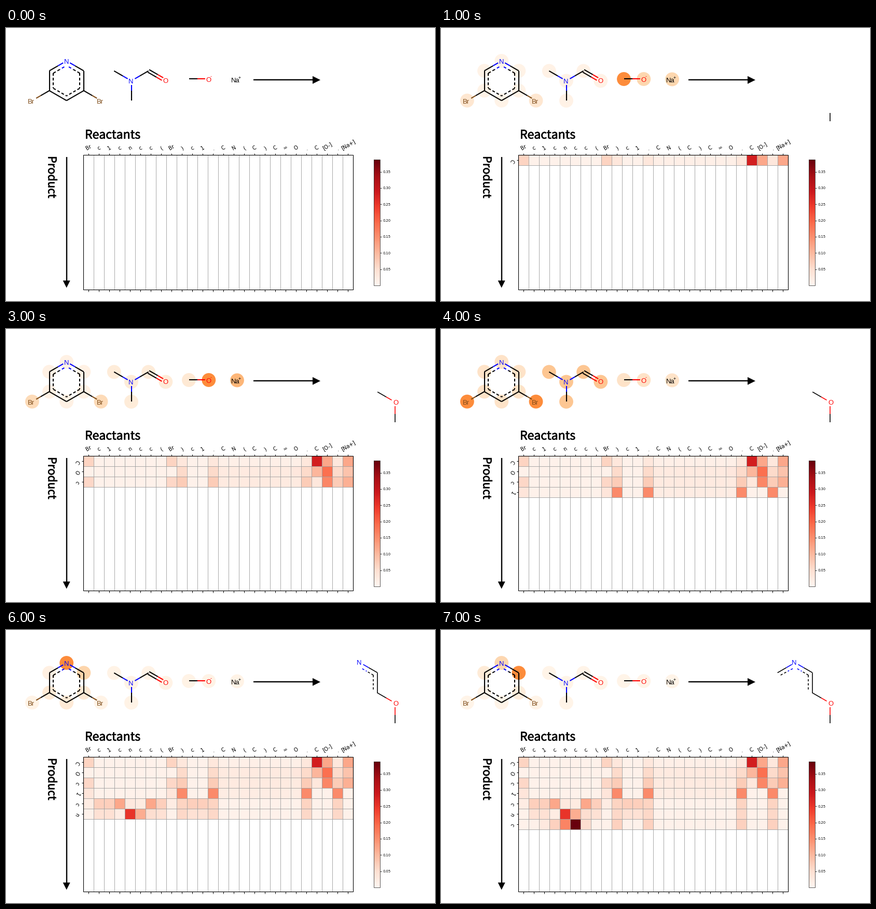
Recreate the animation shown at these times as a matplotlib script. Size 827x527 px, loop 8 s.

```python
import numpy as np
import matplotlib.pyplot as plt
from matplotlib.animation import FuncAnimation
from matplotlib.patches import Circle, Polygon, Rectangle
from matplotlib.patheffects import withStroke

W, H, DPI = 827, 527, 128
PT = 72 / DPI  # points per pixel
BLUE, RED, BROWN, GRAY = "#0000ff", "#ff0000", "#7f4c19", "#a0a0a0"
REDS, ORANGES = plt.get_cmap("Reds"), plt.get_cmap("Oranges")
VMAX = 0.387

TOKENS = "Br c 1 c n c c ( Br ) c 1 . C N ( C ) C = O . C [O-] . [Na+]".split()
OUTPUT = "C O c 1 c n c".split()
ROWS, COLS = 13, len(TOKENS)
LEFT, TOP, CELL = 149.3, 245.3, 20
RIGHT, BOTTOM = LEFT + COLS * CELL, TOP + ROWS * CELL

INDEX = np.arange(COLS)
IS_BREAK = np.isin(TOKENS, [".", ")"]) & (INDEX != 17)
IS_HALIDE = np.isin(TOKENS, ["Br"])
IS_ION = np.isin(TOKENS, ["[O-]", "[Na+]"])
IS_CLOSURE = np.isin(INDEX, [1, 2, 7, 10, 11])
IS_SOLVENT = (INDEX > 12) & (INDEX < 21)


def attend(foci, peak, left, right, breaks, halides=0.0, ions=0.0, closure=0.0, solvent=0.008):
    """Attention row: peaks fading to both sides, over levels per token class."""
    levels = [np.full(COLS, 0.01), IS_SOLVENT * solvent, IS_HALIDE * halides,
              IS_ION * ions, IS_CLOSURE * closure]
    for focus in foci:
        d = INDEX - focus
        levels.append(peak * np.where(d < 0, left, right) ** np.abs(d))
    return np.where(IS_BREAK, breaks, np.max(levels, axis=0))


heat = np.array([
    attend([22], 0.28, 0.1, 0.1, 0.033, halides=0.065, ions=0.12, solvent=0.015),
    attend([23], 0.185, 0.55, 0.1, 0.055, ions=0.085, solvent=0.025),
    attend([23], 0.16, 0.2, 0.2, 0.075, halides=0.06, ions=0.11, solvent=0.025),
    attend([], 0, 0, 0, 0.155, halides=0.035, solvent=0.02),
    attend([3, 6], 0.12, 0.2, 0.25, 0.065, halides=0.02, closure=0.07),
    attend([4], 0.25, 0.08, 0.45, 0.058, closure=0.045),
    attend([5], 0.385, 0.42, 0.13, 0.067),
])


def step(p, degrees, length=38.3):
    a = np.radians(degrees)
    return np.array(p) + length * np.array([np.cos(a), np.sin(a)])


# Input token index -> atom position
CENTER = np.array([116.7, 101.8])
ATOMS = {i: step(CENTER, 60 * k - 90) for k, i in enumerate([4, 5, 6, 10, 1, 3])}
ATOMS[0], ATOMS[8] = step(ATOMS[1], 150), step(ATOMS[6], 30)
ATOMS[14] = np.array([241.5, 102])
ATOMS[13], ATOMS[16], ATOMS[18] = (step(ATOMS[14], a) for a in (210, 90, -30))
ATOMS[20] = step(ATOMS[18], 30)
ATOMS[22] = np.array([352.5, 98.5])
ATOMS[23] = step(ATOMS[22], 0)
ATOMS[25] = np.array([445.5, 99])

fig = plt.figure(figsize=(W / DPI, H / DPI), dpi=DPI, facecolor="white")
ax = fig.add_axes([0, 0, 1, 1])
staged = []  # (artist, first step at which it shows)


def stage(artist, first):
    if first:
        staged.append((artist, first))
    return artist


def line(p, q, color="black", lw=1.0, first=0, dash=None, z=3):
    style = (0, dash) if dash else "-"
    art, = ax.plot([p[0], q[0]], [p[1], q[1]], color=color, lw=lw * PT, ls=style,
                   solid_capstyle="butt", dash_capstyle="butt", zorder=z)
    return stage(art, first)


def text(x, y, s, size, color="black", font="DejaVu Sans", first=0, **kw):
    opts = dict(ha="center", va="center_baseline", zorder=5)
    opts.update(kw)
    return stage(ax.text(x, y, s, fontsize=size * PT, color=color, family=font, **opts), first)


def heading(x, y, s, size, rotation=0):
    text(x, y, s, size, font="Noto Sans CJK JP", ha="left", va="baseline",
         rotation=rotation, rotation_mode="anchor",
         path_effects=[withStroke(linewidth=0.7 * PT, foreground="black")])


def atom_label(x, y, s, color="black", size=13, first=0):
    text(x, y + 0.36 * size, s, size, color, "Liberation Sans", first, va="baseline")


def bond(p, q, cp="black", cq="black", trim=(0, 0), lw=2.1, shift=0, dash=None, first=0):
    """Bond in two halves, each in the colour of its atom."""
    p, q = np.array(p, float), np.array(q, float)
    u = (q - p) / np.hypot(*(q - p))
    side = shift * np.array([-u[1], u[0]])
    a, b, mid = p + u * trim[0] + side, q - u * trim[1] + side, (p + q) / 2 + side
    if cp == cq:
        line(a, b, cp, lw, first, dash)
    else:
        line(a, mid, cp, lw, first, dash)
        line(b, mid, cq, lw, first, dash)


def arrow(tail, neck, tip, lw, half):
    line(tail, neck, lw=lw)
    neck, tip = np.array(neck), np.array(tip)
    u = (tip - neck) / np.hypot(*(tip - neck))
    n = half * np.array([-u[1], u[0]])
    ax.add_patch(Polygon([neck + n, neck - n, tip], color="black", lw=0, zorder=3))


def draw_reactants():
    for path in ((4, 5, 6, 10), (4, 3, 1, 10)):
        for i, j in zip(path, path[1:]):
            color, gap = (BLUE, 1) if i == 4 else ("black", 0)
            p, q = ATOMS[i], ATOMS[j]
            bond(p, q, color, trim=(7.5 * gap, 0))
            p, q = (CENTER + 0.765 * (v - CENTER) for v in (p, q))
            bond(p, q, color, trim=(5 * gap, 0), dash=(2.5, 1.8))
    atom_label(116.7, 64.5, "N", BLUE)
    for ring, br in ((1, 0), (6, 8)):
        bond(ATOMS[ring], ATOMS[br], cq=BROWN, trim=(0, 9))
        atom_label(ATOMS[br][0] - 1.6, 141.7, "Br", BROWN)

    n = ATOMS[14]
    for i in (13, 16, 18):
        bond(n, ATOMS[i], BLUE, trim=(8, 0))
    for shift in (-2.8, 2.8):
        bond(ATOMS[18], ATOMS[20], cq=RED, trim=(0, 7), shift=shift)
    atom_label(241, 102.5, "N", BLUE)
    atom_label(307, 101.5, "O", RED)

    bond((353, 98), (384, 98), cq=RED)
    atom_label(390, 99.5, "O", RED)
    atom_label(395.3, 93, "-", RED, 9)
    atom_label(442, 100.3, "Na")
    atom_label(450.3, 95.3, "+", size=9)


def draw_product():
    o = np.array([750, 141])
    methyl, c1 = step(o, 90, 39), step(o, 210, 39)
    c2 = step(c1, -90, 39)
    n = step(c2, 210, 39)
    c3 = step(n, 150, 39)
    inner = [c1 + (-8, -5), c2 + (-8, 4.6), n + (0, 9.2), c3 + (6, 4.6)]
    lw, dash = 1.6, (2.7, 2.2)
    line((750, 164), methyl, lw=lw, first=1)
    line((750, 148.5), (750, 164), RED, lw, first=2)
    atom_label(751, 141.3, "O", RED, first=2)
    bond(c1, o, cq=RED, trim=(0, 7.5), lw=lw, first=3)
    bond(c2, c1, lw=lw, first=5)
    bond(inner[1], inner[0], lw=lw, dash=dash, first=5)
    for k, c, shadow in ((6, c2, inner[1]), (7, c3, inner[3])):
        bond(n, c, BLUE, trim=(7, 0), lw=lw, first=k)
        bond(inner[2], shadow, BLUE, trim=(5, 0), lw=lw, dash=dash, first=k)
    atom_label(680.6, 62.7, "N", BLUE, first=6)


def draw_grid():
    heading(152, 213.5, "Reactants", 23)
    heading(81.5, 247, "Product", 21.8, rotation=270)
    ax.add_patch(Rectangle((LEFT, TOP), RIGHT - LEFT, BOTTOM - TOP, fill=False,
                           ec="black", lw=1.1 * PT, zorder=4))
    for i, token in enumerate(TOKENS):
        x = LEFT + (i + 0.5) * CELL
        line((x, TOP), (x, TOP - 3.6))
        line((x, BOTTOM), (x, BOTTOM + 3.6))
        text(x, 237.5, token, 10, va="bottom", rotation=30)
        if i:
            x = LEFT + i * CELL
            line((x, TOP), (x, BOTTOM), GRAY, 0.9)
    for k, token in enumerate(OUTPUT, 1):
        y = TOP + k * CELL
        mid = y - CELL / 2
        line((LEFT, mid), (LEFT - 3.6, mid), first=k)
        text(142.5, mid + 1, token, 10, ha="right", va="center", rotation=240, first=k)
        line((LEFT, y), (RIGHT, y), GRAY, 0.9, first=k)


def draw_colorbar():
    x0, x1, y0, y1 = 709.3, 721.3, 254.3, 497
    ax.imshow(np.linspace(1, 0, 256)[:, None], cmap=REDS, extent=(x0, x1, y1, y0),
              aspect="auto", zorder=1)
    ax.add_patch(Rectangle((x0, y0), x1 - x0, y1 - y0, fill=False, ec="#333333",
                           lw=0.8 * PT, zorder=3))
    for k in range(1, 8):
        y = y1 - 0.05 * k / VMAX * (y1 - y0)
        line((x1, y), (x1 + 2.6, y), lw=0.8)
        text(726.4, y, f"{0.05 * k:.2f}", 6.8, ha="left")


cells = ax.imshow(np.full((ROWS, COLS), np.nan), cmap=REDS, vmin=0, vmax=VMAX, aspect="auto",
                  extent=(LEFT, RIGHT, BOTTOM, TOP), interpolation="nearest", zorder=1)
halos = {i: ax.add_patch(Circle(p, 13.4, lw=0, zorder=2)) for i, p in ATOMS.items()}
draw_reactants()
draw_product()
draw_grid()
draw_colorbar()
arrow((477, 100.3), (591, 100.3), (606, 100.3), 2.4, 7.5)
arrow((116.7, 249), (116.7, 487.5), (116.7, 501.5), 2.4, 7)
ax.set_xlim(0, W)
ax.set_ylim(H, 0)
ax.axis("off")


def update(count):
    shown = np.full((ROWS, COLS), np.nan)
    shown[:count] = heat[:count]
    cells.set_data(np.ma.masked_invalid(shown))
    for art, first in staged:
        art.set_visible(count >= first)
    row = heat[count - 1]
    peak = max(row[i] for i in halos)
    for i, halo in halos.items():
        halo.set_visible(count > 0)
        halo.set_facecolor(ORANGES(0.5 * row[i] / peak))
    return []


anim = FuncAnimation(fig, update, frames=8, interval=1000, repeat=True, repeat_delay=0,
                     init_func=lambda: update(0))
plt.show()
```
